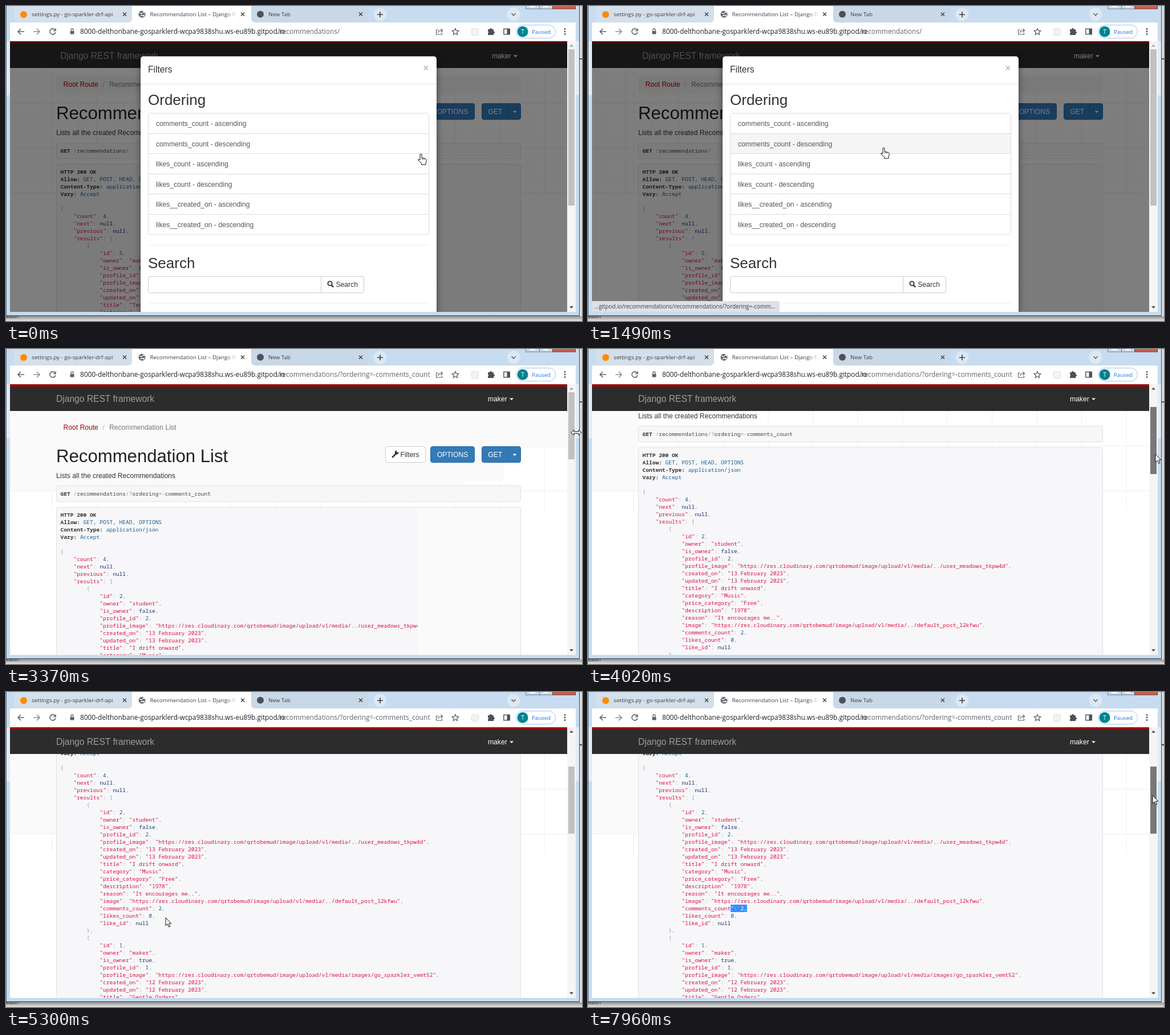
Animation of 1010x554 px, one loop 8 s. Source, as an HTML page:

```html
<!DOCTYPE html>
<html lang="en">
<head>
<meta charset="utf-8">
<title>Filtering an API list</title>
<style>
html, body { margin: 0; width: 100%; height: 100%; overflow: hidden; background: #e4e4e4; }
svg { display: block; width: 1010px; height: 554px; }
text { font-family: "Liberation Sans", Arial, sans-serif; font-size: 12.13px; fill: #333; }
.ui { font-family: "Open Sans", "Noto Sans", sans-serif; }
.code { font-family: "Noto Sans Mono", "DejaVu Sans Mono", monospace; font-size: 9.55px; fill: #48484c; }
.b { font-weight: bold; fill: #333; }
.s, .url { fill: #d14; }
.n { fill: #195f91; }
.k { fill: #1e347b; }
.p { fill: #93a1a1; }
.plain .s, .plain .k, .plain .p, .plain .num { fill: #333; }
.line { fill: none; stroke: #5f6368; stroke-width: 1.6; }
</style>
</head>
<body>
<svg id="stage" viewBox="0 0 1010 554"></svg>
<script>
const LOOP = 8000, CHAR = 5.73, LEFT = 95.5;

// Markup helpers
const rect = (x, y, w, h, fill, extra = '') =>
  `<rect x="${x}" y="${y}" width="${w}" height="${h}" fill="${fill}" ${extra}/>`;
const text = (x, y, str, size, fill, extra = '') =>
  `<text x="${x}" y="${y}" style="font-size:${size}px;fill:${fill}" ${extra}>${str}</text>`;
const ui = (x, y, str, size, fill, extra = '') => text(x, y, str, size, fill, `class="ui" ${extra}`);
const code = (x, y, str) => `<text class="code" x="${x}" y="${y}">${str}</text>`;
const path = (d, extra = 'class="line"') => `<path d="${d}" ${extra}/>`;
const dot = (x, y, r, fill, extra = '') => `<circle cx="${x}" cy="${y}" r="${r}" fill="${fill}" ${extra}/>`;
const group = (id, body, extra = '') => `<g id="${id}" ${extra}>${body}</g>`;
const span = (cls, str) => `<tspan class="${cls}">${str}</tspan>`;
const caret = (x, y, fill) => path(`M${x} ${y}h7l-3.5 3.6z`, `fill="${fill}"`);

// API data
const media = 'https://res.cloudinary.com/qrtobemud/image/upload/v1/media/';
const entry = (id, owner, mine, profile, picture, day, title, rest) => ({
  id, owner, is_owner: mine, profile_id: profile, profile_image: media + picture,
  created_on: day + ' February 2023', updated_on: day + ' February 2023', title, ...rest
});
const avatar = 'images/go_sparkler_vemt52';
const reply = results => ({ count: 4, next: null, previous: null, results });
const before = reply([
  entry(5, 'maker', true, 1, avatar, 13, 'Test', { category: 'Music' })
]);
const after = reply([
  entry(2, 'student', false, 2, '../user_meadows_tkpw4d', 13, 'I drift onward', {
    category: 'Music', price_category: 'Free', description: '1978', reason: 'It encourages me..',
    image: media + '../default_post_l2kfwu', comments_count: 2, likes_count: 0, like_id: null
  }),
  entry(1, 'maker', true, 1, avatar, 12, 'Gentle Orders', { category: 'Books' })
]);

function paint(line) {
  return line.replace(/"[^"]*"|\b\d+\b|null|true|false|[{}[\],:]+/g, tok => {
    if (tok[0] === '"') return span(tok.startsWith('"http') ? 'url' : 's', tok);
    if (/\d/.test(tok)) return span('n num', tok);
    return span(/[a-z]/.test(tok) ? 'k' : 'p', tok);
  });
}

function response(data) {
  const head = ['Allow: GET, POST, HEAD, OPTIONS', 'Content-Type: application/json', 'Vary: Accept']
    .map(h => h.replace(/^(\S+) (.*)/, (_, key, val) => span('b', key) + ' ' + span('n', val)));
  const rows = [span('b', 'HTTP 200 OK'), ...head, ''].map(r => code(LEFT, 0, r));
  for (const line of JSON.stringify(data, null, 4).split('\n')) {
    const body = line.trimStart();
    rows.push(code(LEFT + CHAR * (line.length - body.length), 0, paint(body)));
  }
  return rows.map((row, i) => row.replace('y="0"', `y="${295 + 13 * i}"`)).join('');
}

const navbar = dx => rect(7, 62, 977, 47, '#2c2c2c') + rect(7, 62, 977, 4, '#a30000') +
  text(88 + dx, 93, 'Django REST framework', 15.6, '#9d9d9d') +
  text(845 + dx, 92, 'maker', 12.13, '#fff') + caret(883 + dx, 86.5, '#fff');

const button = (x, w, label, labelX) =>
  rect(x + .5, 171.5, w - 1, 28, '#337ab7', 'rx="3.5" stroke="#2e6da4"') + text(labelX, 190, label, 12.13, '#fff');

const content = (request, data) =>
  text(100.5, 142, 'Root Route', 12.13, '#a30000') + text(169.5, 142, '/', 12.13, '#bbb') +
  text(181, 142, 'Recommendation List', 12.13, '#777') +
  text(88, 198.5, 'Recommendation List', 31.15, '#222') +
  text(88, 227, 'Lists all the created Recommendations', 12.13, '#333') +
  rect(665.5, 171.5, 70, 28, '#fff', 'rx="3.5" stroke="#ccc"') +
  path('M678 190l6-6', 'stroke="#333" stroke-width="2.6" stroke-linecap="round"') +
  path('M688 181.5a3 3 0 1 1-3-2.5l-.5 2.5 1.5 1.2z', 'fill="#333" stroke="#333"') +
  text(691.5, 190, 'Filters', 12.13, '#333') +
  button(744, 78, 'OPTIONS', 755.7) + button(834, 69, 'GET', 845.3) +
  rect(879, 172, 1, 27, '#2e6da4') + caret(888.5, 184.5, '#fff') +
  rect(88.5, 240.5, 814, 28, '#f7f7f9', 'rx="3" stroke="#e1e1e8"') +
  code(LEFT, 257.5, span('b', 'GET') + ' ' + request.replace(/\/\??|=-/g, tok => span('p', tok))) +
  rect(88.5, 278.5, 814, 900, '#f7f7f9', 'rx="3" stroke="#e1e1e8"') + response(data);

function grid(step, bottom, color) {
  let d = '';
  for (let x = 2 + step; x < 984; x += step) d += `M${x} 109V${bottom}`;
  for (let y = 92.5 + step; y < bottom; y += step) d += `M7 ${y}H984`;
  return path(d, `fill="none" stroke="${color}"`);
}

const orders = ['comments_count', 'likes_count', 'likes__created_on']
  .flatMap(f => [f + ' - ascending', f + ' - descending']);
const ROW = 35.6;
const modal = rect(7, 62, 977, 476, '#000', 'opacity=".5"') +
  rect(236, 88.5, 519, 520, '#fff', 'rx="5" style="filter:drop-shadow(0 4px 6px rgba(0,0,0,.5))"') +
  text(249, 117, 'Filters', 15.6, '#333') + text(731, 115, '×', 18, '#aaa') +
  rect(236, 137, 519, 1, '#e5e5e5') + text(249, 174, 'Ordering', 26, '#333') +
  rect(249.5, 188.5, 492, 213.5, '#fff', 'rx="3.5" stroke="#ddd"') +
  rect(250, 224, 491, ROW, '#f5f5f5', 'id="hover"') +
  orders.map((o, i) => (i ? rect(249, Math.round(188 + ROW * i), 493, 1, '#ddd') : '') +
    text(263, 211 + ROW * i, o, 12.13, '#555')).join('') +
  rect(249, 420, 493, 1, '#eee') + text(249, 461, 'Search', 26, '#333') +
  rect(249.5, 475.5, 378, 29, '#fff', 'rx="3.5" stroke="#ccc"') + rect(552, 476, 1, 28, '#ccc') +
  dot(568, 488, 3.6, 'none', 'stroke="#333" stroke-width="1.9"') +
  path('M570.6 490.8l3.6 3.6', 'stroke="#333" stroke-width="2.4"') +
  text(578.5, 494, 'Search', 12.13, '#333') + rect(249, 522, 493, 1, '#eee');

// Browser window
const tabTitle = (x, str, fade) => ui(x, 18.3, str, 9.8, '#3c4043', fade ? 'fill-opacity=".95"' : '');
const cross = x => path(`M${x - 3} 11.5l6 6m0-6l-6 6`, 'stroke="#3c4043" stroke-width="1.4"');
const frame =
  rect(0, 545, 1010, 9, 'url(#shade)') + rect(1006, 0, 4, 546, '#dcdcdc') + rect(1006, 92, 4, 2, '#444') +
  ui(0, 549, 'eadh', 9.5, '#333') +
  rect(0, 0, 1006, 545, '#c7dcf0') + rect(1, 62, 6, 95, '#e3edf6') + rect(999, 62, 6, 95, '#e3edf6') +
  rect(0, 0, 1, 545, '#5b6b7a') + rect(1005, 0, 1, 545, '#3f4d5a') + rect(0, 544, 1006, 1, '#3f4d5a');
const toolbar =
  rect(14, 0, 207, 29, '#d3dfea') + rect(430, 0, 205, 29, '#c9d8e7') +
  path('M214 29q7 0 7-7V0h209v22q0 7 7 7z', 'fill="#fff"') + rect(7, 29, 992, 33, '#fff') +
  dot(31, 15, 6, '#ff8a00') + dot(446, 14.5, 6, '#4d5156') +
  `<g clip-path="url(#tab1)">${tabTitle(45, 'settings.py - go-sparkler-drf-api')}</g>` +
  `<g clip-path="url(#tab2)">${tabTitle(252.5, 'Recommendation List – Django REST')}</g>` +
  rect(386, 5, 19, 20, 'url(#fade)') + tabTitle(460, 'New Tab') +
  [208, 415, 622].map(cross).join('') +
  group('globe', dot(238.5, 14.5, 6, '#5f6368') +
    path('M234 12q4 3 6-.5t3 1M236 18q2-3 4-1t2-2', 'fill="none" stroke="#fff" stroke-width="1.5"')) +
  group('spinner', path('M0-6a6 6 0 0 1 6 6', 'fill="none" stroke="#9db9ee" stroke-width="1.8"')) +
  dot(656, 15, 11.5, '#dce8f3') + path('M651 15h10m-5-5v10', 'stroke="#3c4043" stroke-width="1.6"') +
  dot(890, 14.5, 11.5, '#dce8f3') + path('M886.5 13l3.5 3.5 3.5-3.5') +
  rect(911.5, -5, 24, 10, '#cbdcec', 'stroke="#6d7d8c"') + rect(935.5, -5, 23, 10, '#cbdcec', 'stroke="#6d7d8c"') +
  rect(958.5, -5, 40, 10, '#c9604e', 'stroke="#6b3a34"') + rect(918, 0, 10, 2, '#fff') + rect(942, 0, 9, 2, '#fff') +
  path('M32 45H21m5-5l-5 5 5 5') + path('M48 45h11m-5-5l5 5-5 5', 'class="line" style="stroke:#8b9096"') +
  group('reload', path('M86 42a5 5 0 1 0 .8 4M87 39.5v4h-4')) + group('stop', path('M77 40.5l9 9m0-9l-9 9')) +
  rect(112.5, 44, 7, 5.5, '#5f6368', 'rx="1"') + path('M114 44v-2a2 2 0 0 1 4 0v2', 'class="line" style="stroke-width:1.3"') +
  ui(130, 49, '8000-delthonbane-gosparklerd-wcpa9838shu.ws-eu89b.gitpod.io', 11.85, '#202124') +
  `<text id="route" class="ui" x="475.5" y="49" style="font-size:11.85px;fill:#5f6368"></text>` +
  path('M758 42h-3.5v8h10v-3M757.5 47q1-4 5-4h3m-3-3l3 3-3 3', 'class="line" style="stroke-width:1.2"') +
  path('M788 39.5l1.7 3.7 4 .4-3 2.8.9 4-3.6-2.1-3.6 2.1.9-4-3-2.8 4-.4z', 'class="line" style="stroke-width:1.3"') +
  rect(816.5, 39.5, 12, 12, '#f3f3f3', 'rx="2" stroke="#dedede"') +
  path('M845 41h3a2 2 0 0 1 4 0h3v3.5a2 2 0 0 1 0 4V51h-10v-3a2 2 0 0 0 0-3.5z', 'fill="#4d5156"') +
  rect(872.8, 40.3, 10.4, 9.4, '#fff', 'class="line"') + rect(878.5, 40, 5, 10, '#4d5156') +
  rect(894.5, 33.5, 69, 23, '#fff', 'rx="11.5" stroke="#a3c2f5"') + dot(906, 45, 9.5, '#00838f') +
  ui(906, 48.6, 'T', 10, '#fff', 'text-anchor="middle"') + ui(922, 48.5, 'Paused', 9.65, '#1a73e8') +
  [40.5, 45, 49.5].map(y => dot(980, y, 1.4, '#4d5156')).join('');

const cursors = {
  arrow: path('M0 0V14l3.2-2.9 2.4 5.2 2.2-1-2.4-5.1h4.3z', 'fill="#fff" stroke="#111"'),
  hand: path('M-1 0q1.500-1.500 3 0v6l6.500 1.500q2 .5 1.700 3l-1 4V18H1.500v-2.500L-4 10.500q-1-2 1-2l2 1.500z',
    'fill="#fff" stroke="#111"') + path('M3 9V6.500M6 9.500V7', 'stroke="#111"'),
  resize: path('M-9 0l5-4.500v3h8v-3L9 0 4 4.500v-3h-8v3z', 'fill="#fff" stroke="#111"'),
  beam: path('M-3-7h2.500l.5 1 .5-1H3M0-6V7M-3 8h2.500l.5-1 .5 1H3', 'fill="none" stroke="#111"')
};

document.getElementById('stage').innerHTML = `<defs>
  <clipPath id="page"><rect x="7" y="62" width="977" height="476"/></clipPath>
  <clipPath id="tab1"><rect x="40" y="0" width="153" height="29"/></clipPath>
  <clipPath id="tab2"><rect x="250" y="0" width="154" height="29"/></clipPath>
  <linearGradient id="fade"><stop stop-color="#fff" stop-opacity="0"/><stop offset="1" stop-color="#fff"/></linearGradient>
  <linearGradient id="shade" x2="0" y2="1"><stop stop-color="#8c8c8c"/><stop offset="1" stop-color="#e4e4e4"/></linearGradient>
  </defs>` + frame + `<g clip-path="url(#page)">` +
  group('before', rect(7, 62, 977, 476, '#fdfdfd') + grid(15.7, 330, '#f6f6f6') + grid(78.5, 330, '#eee') +
    rect(88, 124, 815, 29, '#f3f3f3', 'rx="3"') + content('/recommendations/', before) + navbar(7) + modal) +
  group('after', rect(7, 62, 977, 476, '#fafafa') +
    group('settled', rect(7, 62, 977, 476, '#fff') + grid(78.5, 283, '#efefef') + rect(7, 109, 81, 140, '#fafafa')) +
    group('leftover', rect(7, 109, 977, 65, '#fafafa') + rect(7, 174, 866, 59, '#fafafa') + rect(7, 233, 798, 16, '#fafafa')) +
    group('scroll', content('/recommendations/?ordering=-comments_count', after) +
      rect(722, 279, 180, 260, '#fafafb', 'id="pale" style="mix-blend-mode:lighten"') +
      group('selection', rect(0, 597, 0, 13, '#3390ff', 'id="mark"') +
        `<text id="marked" class="code" y="607" style="fill:#fff"></text>`)) + navbar(0)) + '</g>' +
  rect(984, 62, 15, 476, '#f5f5f5') + rect(986, 76, 11, 118, '#c1c1c1', 'id="thumb"') +
  path('M988 71.500h7l-3.500-4z', 'id="up"') + path('M988 528h7l-3.500 4z', 'fill="#505050"') +
  group('status', path('M7 519h325q4 0 4 4v15H7z', 'fill="#dee1e6"') +
    `<text id="link" class="ui" x="11" y="532" style="font-size:9.9px;fill:#3c4043"></text>`) +
  toolbar + Object.entries(cursors).map(([id, shape]) => group(id, shape)).join('');

// Motion: start, end, number of steps, evenly timed path points
const moves = [
  [60, 500, 7, [[727, 261], [690, 279], [625, 275]]],
  [760, 1490, 12, [[625, 275], [570, 226], [518, 250]]],
  [2300, 2700, 7, [[517, 249], [807, 261]]],
  [2940, 3720, 12, [[807, 261], [905, 200], [1000, 147], [1000, 148], [995, 159]]],
  [3850, 4500, 9, [[995, 159], [995, 185], [995, 210], [994, 214.2]]],
  [4680, 4860, 4, [[994, 214.2], [416, 375]]],
  [5030, 5740, 12, [[416, 375], [345, 386], [280, 397], [280, 397], [280, 397], [285, 390], [291, 380]]],
  [5920, 6280, 6, [[291, 380], [253, 380]]],
  [6590, 6770, 4, [[253, 380], [823, 271]]],
  [6950, 7610, 11, [[823, 271], [1000, 190], [990, 182]]]
];

function pointer(t) {
  const move = moves.filter(m => t >= m[0]).pop();
  if (!move) return moves[0][3][0];
  const [start, end, steps, pts] = move;
  const done = Math.min(steps, 1 + Math.floor((t - start) / (end - start) * (steps - 1) + 1e-6));
  const pos = done / steps * (pts.length - 1), i = Math.min(Math.floor(pos), pts.length - 2);
  return pts[i].map((v, axis) => v + (pts[i + 1][axis] - v) * (pos - i));
}

const el = id => document.getElementById(id);
const show = (id, on) => { el(id).style.display = on ? '' : 'none'; };
const set = (id, attrs) => Object.entries(attrs).forEach(([k, v]) => el(id).setAttribute(k, v));

function draw(t) {
  const [x, y] = pointer(t);
  const loaded = t >= 2050, settled = t >= 2450, loading = t >= 1940 && t < 2650;
  const scroll = t < 3850 ? 0 : t < 4500 ? Math.round((y - 159) * 206 / 51) : 223;

  show('before', !loaded);
  show('after', loaded);
  show('settled', settled);
  show('leftover', settled && t < 3850);
  show('pale', t < 3850);
  set('after', { class: settled ? '' : 'plain' });
  set('scroll', { transform: `translate(0 ${-scroll})` });
  el('route').textContent = '/recommendations/' + (loaded ? '?ordering=-comments_count' : '');

  const row = Math.floor((y - 188) / ROW);
  show('hover', t >= 60);
  set('hover', { y: 189 + ROW * row, height: ROW - 1 });
  show('status', t >= 300 && t < 2450);
  el('link').textContent = '...gitpod.io/recommendations/recommendations/?ordering=' +
    (t < 1940 && row === 2 ? 'likes_...' : '-comm...');

  show('globe', !loading);
  show('spinner', loading);
  set('spinner', { transform: `translate(239 14.5) rotate(${Math.floor((t - 2170) / 60) * 40})` });
  show('stop', loading);
  show('reload', !loading);

  const top = 76 + scroll * 51 / 206, height = !loaded ? 275 : settled ? 118 : 143;
  const pressed = t >= 3850 && t < 4680 || t >= 7910;
  const over = x >= 986 && x < 998 && y > top && y < top + height;
  set('thumb', { y: top, height, fill: pressed ? '#787878' : over ? '#a8a8a8' : '#c1c1c1' });
  set('up', { fill: scroll ? '#505050' : '#a3a3a3' });

  const tail = '": 2,', start = LEFT + CHAR * 32;
  const count = t < 5920 ? 0 : t >= 6280 ? 5 : Math.max(0, Math.min(5, Math.round((start - x) / CHAR)));
  const markX = start - count * CHAR;
  set('mark', { x: markX, width: count * CHAR });
  set('marked', { x: markX });
  el('marked').textContent = count ? tail.slice(-count) : '';

  const kind = t < 2050 ? 'hand' : x > 998 ? 'resize' : t >= 5980 && t < 6590 ? 'beam' : 'arrow';
  for (const id in cursors) show(id, id === kind);
  set(kind, { transform: `translate(${Math.round(x)} ${Math.round(y)})` });
}

const begin = performance.now();
function tick() {
  draw((performance.now() - begin) % LOOP);
  requestAnimationFrame(tick);
}
tick();
</script>
</body>
</html>
```
